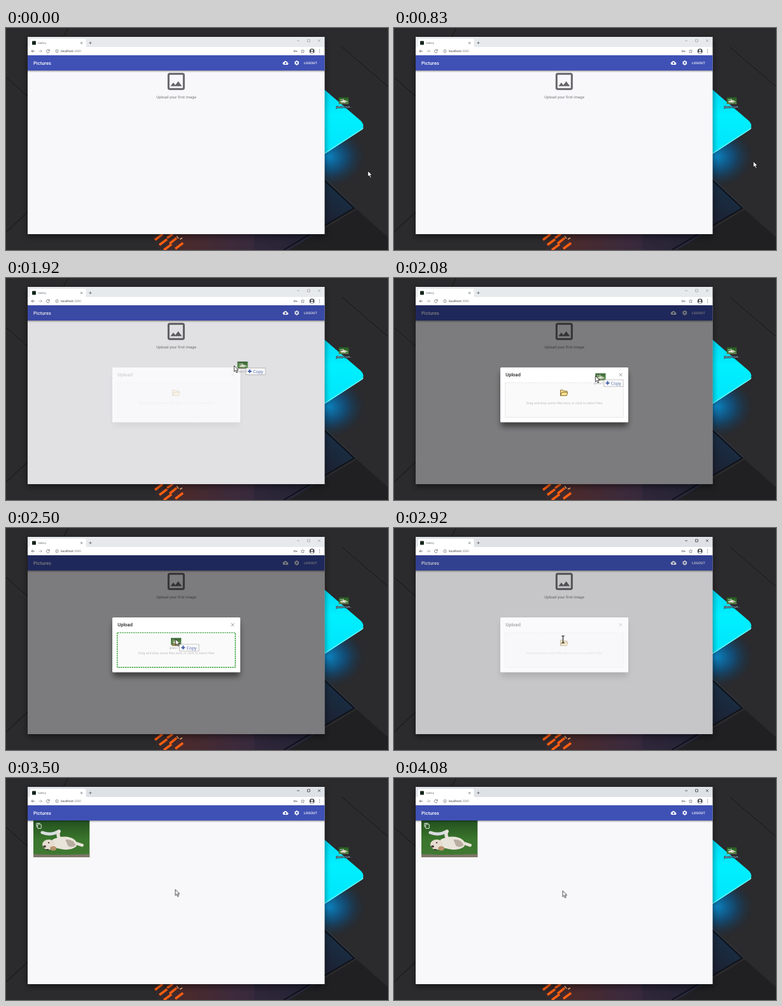
Animation of 600x350 px, one loop 4.16 s. Source, as an HTML page:

```html
<!DOCTYPE html>
<html lang="en">
<head>
<meta charset="utf-8">
<title>Drag and drop upload</title>
<style>
html, body { margin: 0; width: 100%; height: 100%; overflow: hidden; background: #2b2a2c; }
svg { display: block; }
.stage { width: 600px; height: 350px; }
text { font-family: Roboto, sans-serif; text-rendering: geometricPrecision; }
.ui { font-family: "Open Sans", sans-serif; }
.title { font-size: 7.4px; font-weight: 500; letter-spacing: .0075em; }
.line { fill: none; stroke: #5f6368; stroke-width: .8; }

/* One loop is 50 ticks, so each tick is 2% */
.anim { animation: 4160ms step-end -5ms infinite; }
.pointer { animation-name: pointer; }
.arrow { animation-name: arrow; }
.beam { animation-name: beam; }
.drag { animation-name: drag; }
.tip { animation-name: tip; }
.hover { animation-name: hover; }
.modal { animation-name: modal; }
.drop { animation-name: drop; }
.strip { animation-name: strip; }
.buttons { animation-name: buttons; }
.empty { animation-name: empty; }
.gallery { animation-name: gallery; }

@keyframes pointer {
  0% { transform: translate(568px, 225px); }
  18% { transform: translate(568px, 225px); animation-timing-function: steps(4); }
  26% { transform: translate(552px, 165px); animation-timing-function: steps(3); }
  32% { transform: translate(531px, 112px); }
  34% { transform: translate(530px, 110.5px); }
  38% { transform: translate(530px, 110.5px); animation-timing-function: steps(4); }
  46% { transform: translate(358px, 138px); animation-timing-function: steps(4); }
  54% { transform: translate(274px, 170px); animation-timing-function: steps(3); }
  60% { transform: translate(266px, 175px); }
  68% { transform: translate(265.5px, 175.5px); }
  96% { transform: translate(265px, 176.5px); }
  98%, 100% { transform: translate(264.5px, 177.5px); }
}
@keyframes drag {
  0% { transform: translate(531px, 113px); opacity: 0; }
  38% { transform: translate(531px, 113px); opacity: 0; }
  40% { transform: translate(491px, 118.5px); opacity: .9; animation-timing-function: steps(3); }
  46% { transform: translate(371.5px, 135px); opacity: .9; animation-timing-function: steps(4); }
  54% { transform: translate(277px, 172px); opacity: .9; animation-timing-function: steps(3); }
  60% { transform: translate(267px, 176.5px); opacity: .9; }
  68%, 100% { transform: translate(267px, 176.5px); opacity: 0; }
}
@keyframes arrow { 0%, 76%, 100% { opacity: 1; } 68% { opacity: 0; } }
@keyframes beam { 0%, 76%, 100% { opacity: 0; } 68% { opacity: 1; } }
@keyframes tip { 0% { opacity: 0; } 42%, 100% { opacity: 1; } }
@keyframes hover { 0%, 40%, 100% { opacity: 0; } 30% { opacity: 1; } }
@keyframes modal {
  0%, 74%, 100% { opacity: 0; }
  46% { opacity: .18; }
  48% { opacity: .83; }
  50% { opacity: 1; }
  68% { opacity: .9; }
  70% { opacity: .4; }
  72% { opacity: .07; }
}
@keyframes drop { 0%, 68%, 100% { stroke: #e4e4e4; } 54% { stroke: #0a8a0a; } }
@keyframes strip { 0% { fill: #e7eaed; } 68%, 100% { fill: #dee1e6; } }
@keyframes buttons { 0% { stroke: #999; } 68%, 100% { stroke: #222; } }
@keyframes empty { 0% { opacity: 1; } 82%, 100% { opacity: 0; } }
@keyframes gallery { 0% { opacity: 0; } 82%, 100% { opacity: 1; } }
</style>
</head>
<body>
<svg class="stage" viewBox="0 0 600 350">
  <defs>
    <radialGradient id="glow">
      <stop offset="0" stop-color="#0b86c4"/>
      <stop offset=".45" stop-color="#0d5486" stop-opacity=".8"/>
      <stop offset="1" stop-color="#1a2c40" stop-opacity="0"/>
    </radialGradient>
    <linearGradient id="floor">
      <stop offset="0" stop-color="#2b2a2c"/>
      <stop offset=".2" stop-color="#4a2a2c"/>
      <stop offset=".5" stop-color="#3c2a3c"/>
      <stop offset="1" stop-color="#20263a"/>
    </linearGradient>
    <linearGradient id="panel" x1="1" y1="0" x2="0" y2="1">
      <stop offset="0" stop-color="#17364f"/>
      <stop offset=".45" stop-color="#1c2132"/>
      <stop offset="1" stop-color="#30263a"/>
    </linearGradient>
    <linearGradient id="cyan" x1="0" y1="0" x2="0" y2="1">
      <stop offset="0" stop-color="#00d8f4"/>
      <stop offset=".4" stop-color="#00f0ff"/>
      <stop offset="1" stop-color="#00e4fa"/>
    </linearGradient>
    <linearGradient id="grass" x1="0" y1="0" x2="0" y2="1">
      <stop offset="0" stop-color="#23501f"/>
      <stop offset=".5" stop-color="#3a752c"/>
      <stop offset="1" stop-color="#417a33"/>
    </linearGradient>
    <linearGradient id="barShade" x1="0" y1="0" x2="0" y2="1">
      <stop offset="0" stop-opacity=".35"/>
      <stop offset="1" stop-opacity="0"/>
    </linearGradient>
    <filter id="soft" x="-20%" y="-20%" width="140%" height="150%"><feGaussianBlur stdDeviation="5"/></filter>
    <symbol id="photo" viewBox="0 0 88 58" preserveAspectRatio="none">
      <path fill="url(#grass)" d="M0 0H88V58H0z"/>
      <path fill="#80776a" d="M0 53Q30 55 88 53V58H0z"/>
      <g fill="none" stroke="#d9dce0" stroke-linecap="round" stroke-width="5">
        <path d="M14 19Q24 23 33 20L40 17"/>
        <path stroke="#e6e1d9" d="M40 17Q36 25 44 31M64 35L76 39"/>
      </g>
      <path fill="#e9e4da" d="M30 30Q45 23 58 27Q70 31 67 41Q58 48 43 45L29 42z"/>
      <path fill="#b7ada0" d="M50 30Q63 29 66 39Q60 44 54 40z"/>
      <ellipse cx="24" cy="38" rx="10" ry="8" fill="#e6ddd0"/>
      <ellipse cx="31" cy="44" rx="5" ry="3.5" fill="#b8926c"/>
      <path fill="#453b35" d="M15 40l4-1 1 3-4 1zM23 34h2v2h-2zM20 45h4v2h-4z"/>
    </symbol>
  </defs>

  <!-- Desktop -->
  <path fill="#2b2a2c" d="M0 0H600V350H0z"/>
  <g fill="none" stroke="#1d1c1e" stroke-width="1.2">
    <path d="M0 78L34 108M98 0L90 14M528 30L600 92M0 322L34 290"/>
    <path stroke="#363538" stroke-width=".6" d="M0 80L34 110M530 30L600 90"/>
  </g>
  <path fill="url(#floor)" d="M225 320H500V350H240z"/>
  <ellipse cx="506" cy="203" rx="60" ry="50" fill="url(#glow)"/>
  <path fill="url(#panel)" d="M490 230L547 284L436 350H390V320H490z"/>
  <path fill="none" stroke="#0e1118" stroke-width="2" d="M498 238L547 284L436 350"/>
  <path fill="none" stroke="#315070" stroke-width=".6" d="M499 236L549 283"/>
  <path fill="#202023" d="M551 286L600 330V350H444z"/>
  <g stroke="#ff5f12" stroke-width="3.6">
    <path d="M234 334L246 325M241 342L253 333M248 350L260 341M253 331L262 325M257 340L268 331M266 348L278 339"/>
    <path stroke="#ffb27a" stroke-width="1.4" d="M268 328l3 4M273 333l4-2"/>
  </g>
  <path fill="url(#cyan)" d="M500 97L557 146Q565 154 558 161L500 199z"/>
  <path fill="none" stroke="#7dfbff" stroke-width="1.2" d="M561 157Q560 160 557 161L500 198"/>

  <g>
    <use href="#photo" x="522.5" y="109" width="16" height="11"/>
    <text class="ui" x="531" y="126" font-size="4.1" text-anchor="middle" fill="#fff" stroke="#123" stroke-width=".9" paint-order="stroke">photo-1529...</text>
    <path class="anim hover" fill="#8fa3ad" fill-opacity=".45" stroke="#9fb0b8" stroke-opacity=".7" stroke-width=".6" d="M518.3 103.3H545V128H518.3z"/>
  </g>

  <!-- Browser -->
  <path filter="url(#soft)" opacity=".45" d="M34 17H501V329H34z"/>
  <path class="anim strip" d="M34 14H500.5V30H34z"/>
  <path fill="#fff" d="M34 30H36Q37.5 30 37.5 28V19.500Q37.500 17 40 17H123Q125.500 17 125.500 19.500V28Q125.500 30 127 30H500.500V43.500H34z"/>
  <rect x="41" y="20.500" width="6" height="6" rx=".8" fill="#14241a"/>
  <text class="ui" x="50" y="25.200" font-size="4" fill="#55585c">Gallery</text>
  <g class="line">
    <path d="M117 22l3.200 3.200m0-3.200l-3.200 3.200M130.300 23.500h4.400m-2.200-2.200v4.400"/>
    <path d="M45 36.500h-5m2.300-2.300L40 36.500l2.300 2.300"/>
    <path stroke="#aaa" d="M51.500 36.500h5m-2.300-2.300l2.300 2.300-2.300 2.300"/>
    <path d="M68 35.300a2.400 2.400 0 1 0 .2 2M68.300 33.800v1.900h-1.900"/>
    <circle cx="80" cy="36.500" r="2.300" stroke-width=".6"/>
    <path stroke-width=".6" d="M80 36v1.700m0-2.800v.6"/>
    <path d="M466 33.900l.8 1.800 1.900.2-1.400 1.300.4 1.900-1.700-1-1.700 1 .4-1.900-1.400-1.300 1.900-.2z" stroke-width=".6"/>
    <circle cx="453.300" cy="36.500" r="1.200"/>
    <path d="M454.500 36.500h3m-.7 0v1.300"/>
  </g>
  <circle cx="480.600" cy="36.500" r="4" fill="#50545a"/>
  <path fill="#fff" d="M479.100 35.200a1.500 1.500 0 1 1 3 0a1.500 1.500 0 1 1-3 0M477.900 38.900q2.700-2.600 5.400 0q-2.700 2.300-5.400 0z"/>
  <path stroke="#5f6368" stroke-width="1.100" stroke-linecap="round" d="M492.600 34.400v.01m0 2.100v.01m0 2.100v.01"/>
  <text class="ui" x="86" y="38.300" font-size="4.750" fill="#202124">localhost<tspan fill="#777">:3000</tspan></text>
  <path class="anim buttons" fill="none" stroke-width=".7" d="M457 20h4M473.500 18h3.800v3.800h-3.800zM490 18l3.800 3.800m0-3.800l-3.800 3.800"/>

  <!-- Page -->
  <path fill="#f8f7fa" d="M34 43H500.500V325H34z"/>
  <g class="anim empty" fill="#66666a">
    <path transform="translate(249.300 66.300) scale(1.500)" d="M19 5v14H5V5h14m0-2H5c-1.100 0-2 .9-2 2v14c0 1.100.9 2 2 2h14c1.100 0 2-.9 2-2V5c0-1.100-.9-2-2-2zm-4.860 8.860l-3 3.870L9 13.140 6 17h12l-3.860-5.140z"/>
    <text x="236.300" y="110.700" font-size="5.950" letter-spacing=".056" fill="#757578">Upload your first image</text>
  </g>
  <g class="anim gallery">
    <use href="#photo" x="43" y="67" width="88.500" height="58"/>
    <g fill="none" stroke="#fff" stroke-width=".9">
      <rect x="49.700" y="73" width="5.600" height="6.500" rx=".6"/>
      <path d="M48 77.500V71.400h5.500"/>
    </g>
  </g>
  <path fill="url(#barShade)" d="M34 67H500.500V70H34z"/>
  <path fill="#3f51b5" d="M34 43H500.500V67H34z"/>
  <g fill="#fff">
    <text class="title" x="43" y="57.700">Pictures</text>
    <text x="468" y="57" font-size="5.200" font-weight="500" letter-spacing=".149">LOGOUT</text>
    <path transform="translate(434.600 50.600) scale(.37)" d="M19.350 10.040C18.670 6.590 15.640 4 12 4 9.110 4 6.600 5.640 5.350 8.040 2.340 8.360 0 10.910 0 14c0 3.310 2.690 6 6 6h13c2.760 0 5-2.240 5-5 0-2.640-2.050-4.780-4.650-4.960zM14 13v4h-4v-4H7l5-5 5 5h-3z"/>
  </g>
  <g fill="none" stroke="#fff" transform="translate(456.700 55)">
    <circle r="2.200" stroke-width="1.600"/>
    <path stroke-width="1.700" d="M0-3.700v1.200m0 5v1.200M-3.200-1.850l1 .6m4.400 2.500l1 .6M-3.200 1.850l1-.6m4.400-2.500l1-.6"/>
  </g>

  <!-- Upload dialog -->
  <g class="anim modal">
    <path fill-opacity=".5" d="M34 43H500.500V325H34z"/>
    <rect x="168" y="149" width="199" height="85" rx="2" filter="url(#soft)" opacity=".5"/>
    <rect x="167" y="141" width="201" height="86.500" rx="1.500" fill="#fff"/>
    <text class="title" x="175.300" y="155" fill="#212121">Upload</text>
    <path fill="none" stroke="#777" stroke-width=".8" d="M353.700 150.200l4.600 4.600m0-4.600l-4.600 4.600"/>
    <rect class="anim drop" x="174.700" y="165" width="185.500" height="54.700" rx=".7" fill="#fafafa" stroke-width="1.200" stroke-dasharray="2.300 1.200"/>
    <path fill="#ffe08a" stroke="#6b5220" stroke-width=".8" d="M261.500 185.500V176.700h4l1.200 1.500h5v2M261.500 185.500l2-5.300h9.300l-1.500 5.300z"/>
    <text x="267.500" y="199" font-size="5.200" text-anchor="middle" fill="#bdbdbd">Drag and drop some files here, or click to select files</text>
  </g>

  <!-- Dragged file and pointer -->
  <g class="anim drag">
    <use href="#photo" x="-8" y="-3.500" width="16.500" height="11.500"/>
    <text class="ui" x="0" y="14" font-size="4.100" text-anchor="middle" fill="#555" opacity=".7">photo-15...</text>
    <g class="anim tip">
      <rect x="5.500" y="7" width="30.500" height="10.300" fill="#fff" stroke="#8a8a8a" stroke-width=".6"/>
      <path stroke="#1c3f94" stroke-width="1.700" d="M8.300 12.100h6m-3-3v6"/>
      <text class="ui" x="16.500" y="14.600" font-size="6.800" fill="#24408f">Copy</text>
    </g>
  </g>
  <g class="anim pointer">
    <path class="anim arrow" fill="#fff" stroke="#111" stroke-width=".8" stroke-linejoin="round" d="M.3.300V9.600L2.500 7.600L4 11.200L5.700 10.500L4.200 7H7.100z"/>
    <path class="anim beam" fill="none" stroke="#111" stroke-width="1.200" d="M-2.400-5.500Q0-5.500 0-4V4.500Q0 6-2.400 6M2.400-5.500Q0-5.500 0-4M0 4.500Q0 6 2.400 6"/>
  </g>
</svg>
</body>
</html>
```
